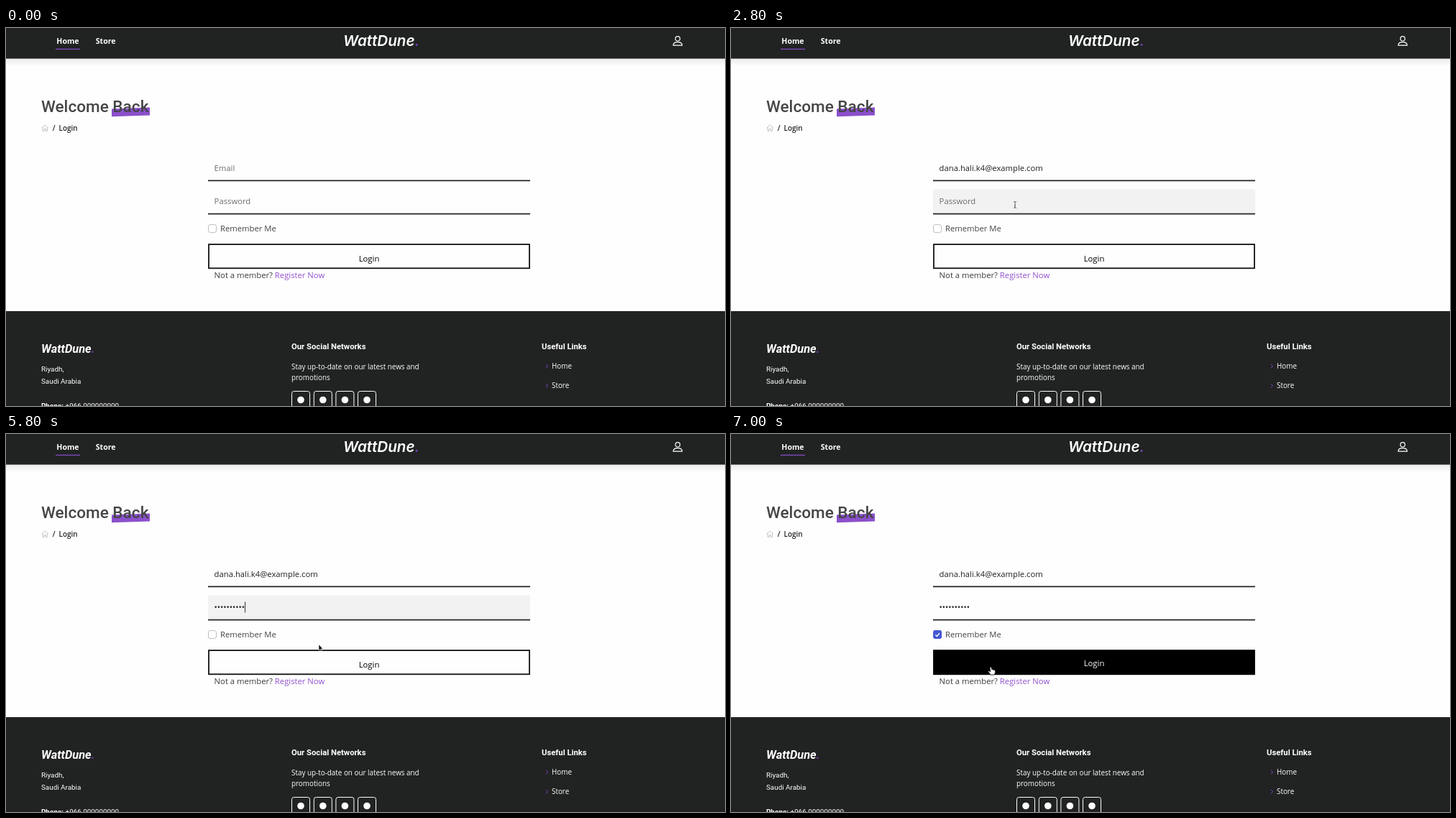
Write an HTML page that moves like this. It is 1000 by 526 pixels and loops after 7200 ms.

```html
<!DOCTYPE html>
<html lang="en">
<head>
<meta charset="utf-8">
<title>Login</title>
<style>
  html, body { margin: 0; width: 100%; height: 100%; overflow: hidden; background: #fefefe; }
  svg { display: block; width: 100%; height: 100%; font: 11.28px "Open Sans", sans-serif; }
  .small { font-size: 9.87px; }
  .nav { font-size: 10.57px; font-weight: 700; }
  .semi { font-weight: 600; }
  .roboto { font-family: Roboto, sans-serif; }
  .head { font: 700 11.28px Roboto, sans-serif; }
  .title { font: 500 22.56px Roboto, sans-serif; fill: #454545; }
  .brand { font: italic 600 20.6px Inter, sans-serif; }
  .brand2 { font: italic 700 16.4px Roboto, sans-serif; }
  .white { fill: #fff; }
  .violet { fill: #9050cc; }
  .hint { fill: #6d6d6d; }
  .ink { fill: #222; }
  .line { fill: none; stroke: #fff; stroke-width: 1.2; }
</style>
</head>
<body>
<svg viewBox="0 0 1000 526">
  <defs>
    <linearGradient id="shade" x2="0" y2="1">
      <stop stop-color="#e9e9e9"/><stop offset="1" stop-color="#fefefe"/>
    </linearGradient>
  </defs>
  <rect width="1000" height="526" fill="#fefefe"/>

  <!-- header -->
  <rect y="42" width="1000" height="11" fill="url(#shade)"/>
  <rect width="1000" height="42.6" fill="#212222"/>
  <g class="white nav">
    <text x="70.3" y="22.4">Home</text>
    <text x="124.8" y="22.4">Store</text>
  </g>
  <rect x="69" y="28.7" width="34" height="1.4" fill="#7d48b8"/>
  <text class="white brand" x="469" y="25">WattDune<tspan fill="#6f3fae">.</tspan></text>
  <g class="line">
    <circle cx="934.2" cy="14.8" r="3.2"/>
    <path d="M928 24.2q0-4.6 6.2-4.6t6.2 4.6z" stroke-linejoin="round"/>
  </g>

  <!-- title -->
  <path d="M147 112.6L200 110.4V121.4L147 123.2z" fill="#8b50cb"/>
  <text class="title" x="49" y="116.6">Welcome Back</text>
  <path d="M49.8 139.2L54.3 134.8L58.8 139.2M51 138.2V143.4H53.2V140.4H55.4V143.4H57.6V138.2" fill="none" stroke="#b5b5b5" stroke-width=".8"/>
  <g class="small semi ink">
    <text x="64.8" y="142.6">/</text>
    <text x="73.6" y="142.6">Login</text>
  </g>

  <!-- form -->
  <rect id="mailBg" x="281" y="178" width="448" height="34" fill="#f2f2f2"/>
  <rect id="passBg" x="281" y="224.5" width="448" height="34" fill="#f2f2f2"/>
  <path d="M281 212.3H729M281 258.6H729" stroke="#242424" stroke-width="1.7"/>
  <text id="mail" x="289.6" y="199"></text>
  <text id="pass" x="289.6" y="245.4"></text>
  <rect id="caret" width="1" height="15" fill="#333"/>

  <rect x="281.5" y="273.6" width="11" height="11" rx="2.8" fill="#fff" stroke="#bcbcbc"/>
  <g id="tick">
    <rect id="ring" x="279.7" y="271.7" width="14.8" height="14.8" rx="4.5" fill="#fff" stroke="#b4c0f0" stroke-width="2.2"/>
    <rect x="281.1" y="273.1" width="12" height="12" rx="3" fill="#4358d2"/>
    <path d="M284.3 279.4L286.4 281.4L290 277.2" fill="none" stroke="#fff" stroke-width="1.4"/>
  </g>
  <text x="298" y="283.4" fill="#444">Remember Me</text>

  <rect id="btn" x="282" y="301.1" width="446" height="33.2" stroke="#111" stroke-width="1.8"/>
  <text id="btnText" x="505" text-anchor="middle">Login</text>
  <text x="289.6" y="347.7" fill="#3c3c3c">Not a member? <tspan class="violet">Register Now</tspan></text>

  <!-- footer -->
  <rect y="394" width="1000" height="132" fill="#212222"/>
  <text class="white brand2" x="49" y="451.6">WattDune<tspan fill="#6f3fae">.</tspan></text>
  <g class="white small roboto">
    <text x="49" y="478.2">Riyadh,</text>
    <text x="49" y="495">Saudi Arabia</text>
    <text x="49" y="528.6"><tspan font-weight="700">Phone:</tspan> +966 000000000</text>
  </g>
  <g class="white head">
    <text x="397" y="446.8">Our Social Networks</text>
    <text x="745" y="446.8">Useful Links</text>
  </g>
  <g class="white small">
    <text x="397" y="475.4">Stay up-to-date on our latest news and</text>
    <text x="397" y="490.2">promotions</text>
    <text x="759" y="474.2">Home</text>
    <text x="759" y="501">Store</text>
  </g>
  <path d="M751 468l2.6 2.7l-2.6 2.7M751 495l2.6 2.7l-2.6 2.7" fill="none" stroke="#8448c4"/>
  <g id="social"></g>

  <!-- pointers, hot spot at 0,0 -->
  <g id="arrow">
    <path d="M0 0V8.2L1.9 6.5L3.2 9.3L4.5 8.7L3.2 6H5.8z" fill="#111" stroke="#fff" stroke-width=".5"/>
  </g>
  <g id="beam">
    <path d="M-2-4.5Q0-4.5 0-3Q0-4.5 2-4.5M0-3V3M-2 4.5Q0 4.5 0 3Q0 4.5 2 4.5M-1 1.2H1" fill="none" stroke="#555" stroke-width=".9"/>
  </g>
  <g id="hand">
    <path d="M-1 .8Q0-.8 1.1.8L1.8 3.8Q3 3.2 3.6 4.2Q5 3.6 5.4 4.9Q6.6 4.7 6.6 6.2Q6.6 9 5.2 11H-.2Q-1.4 8.6-3.6 6.6Q-3.4 5.2-1.8 5.9L-.2 7z" fill="#fff" stroke="#222" stroke-width=".9" stroke-linejoin="round"/>
  </g>
</svg>
<script>
const LOOP = 7200, STEP = 100, BLINK = 500;
const EMAIL = "dana.hali.k4@example.com";
const FOCUS_MAIL = 800, PASTE = 1600, FOCUS_PASS = 2300, CHECK = 6300, HOVER = 6600;
const KEYS = [3400, 3600, 3700, 3900, 4100, 4300, 4600, 4900, 5100, 5400];
// time, x, y
const PATH = [
  [300, 520, 375], [400, 500, 350], [600, 500, 350], [800, 405, 206],
  [1800, 405, 206], [2200, 395, 246], [5500, 395, 246], [5800, 435, 293],
  [6200, 288, 279], [6400, 288, 279], [6600, 345, 315], [7000, 361, 324]
];
const $ = id => document.getElementById(id);
const set = (id, attrs) => {
  for (const k in attrs) $(id).setAttribute(k, attrs[k]);
};
const ramp = (t, from, len) => Math.min(1, Math.max(0, (t - from) / len));
const grey = v => { const c = Math.round(v * 255); return `rgb(${c},${c},${c})`; };

$("social").innerHTML = [397.5, 428.3, 458.9, 489.5].map(x =>
  `<rect class="line" style="stroke-width:1" x="${x}" y="505.5" width="25" height="25" rx="3"/>
   <circle class="white" cx="${x + 12.5}" cy="517.5" r="4.8"/>`).join("");

function pointerAt(t) {
  if (t < PATH[0][0]) return null;
  let i = PATH.findIndex(p => p[0] > t);
  if (i < 0) return PATH[PATH.length - 1].slice(1);
  const [a, b] = [PATH[i - 1], PATH[i]];
  const k = ramp(t, a[0], b[0] - a[0]);
  return [a[1] + (b[1] - a[1]) * k, a[2] + (b[2] - a[2]) * k];
}

function drawPointer(t) {
  const p = pointerAt(t);
  let kind = "";
  if (p) {
    const y = p[1];
    const field = y > 178 && y < 213 || y > 224 && y < 260;
    kind = field ? "beam" : t >= HOVER ? "hand" : "arrow";
    set(kind, { transform: `translate(${p[0]} ${p[1]})` });
  }
  for (const id of ["arrow", "beam", "hand"]) set(id, { visibility: id === kind ? "visible" : "hidden" });
}

function field(id, text, hint) {
  const el = $(id);
  el.textContent = text || hint;
  el.setAttribute("class", text ? "ink" : "hint");
  return 290 + (text ? el.getComputedTextLength() : 0);
}

function draw(t) {
  set("mailBg", { opacity: ramp(t, FOCUS_MAIL, 200) - ramp(t, FOCUS_PASS, 200) });
  set("passBg", { opacity: ramp(t, FOCUS_PASS, 200) - ramp(t, CHECK, 200) });

  const typed = KEYS.filter(k => k <= t);
  const mailEnd = field("mail", t >= PASTE ? EMAIL : "", "Email");
  const passEnd = field("pass", "•".repeat(typed.length), "Password");

  // the caret restarts its blink at each input
  const inPass = t >= FOCUS_PASS;
  const since = t - Math.max(...[FOCUS_MAIL, PASTE, FOCUS_PASS, ...typed].filter(k => k <= t));
  const on = t >= FOCUS_MAIL && t < CHECK && since % (2 * BLINK) < BLINK;
  set("caret", {
    x: Math.round(inPass ? passEnd : mailEnd),
    y: inPass ? 233.5 : 187.5,
    visibility: on ? "visible" : "hidden"
  });

  set("tick", { opacity: t >= CHECK ? 1 : 0 });
  set("ring", { opacity: 1 - ramp(t, 6800, 200) });

  const hover = t >= HOVER, dark = ramp(t, HOVER, 350);
  const fill = hover ? grey(1 - dark) : "#fefefe";
  set("btn", { fill, stroke: hover ? fill : "#111" });
  set("btnText", { y: hover ? 323.3 : 324.7, fill: grey(dark) });
  drawPointer(t);
}

const start = performance.now();
function tick() {
  const t = Math.max(0, performance.now() - start) % LOOP;
  draw(Math.floor((t + 1) / STEP) * STEP % LOOP);
  requestAnimationFrame(tick);
}
tick();
</script>
</body>
</html>
```
